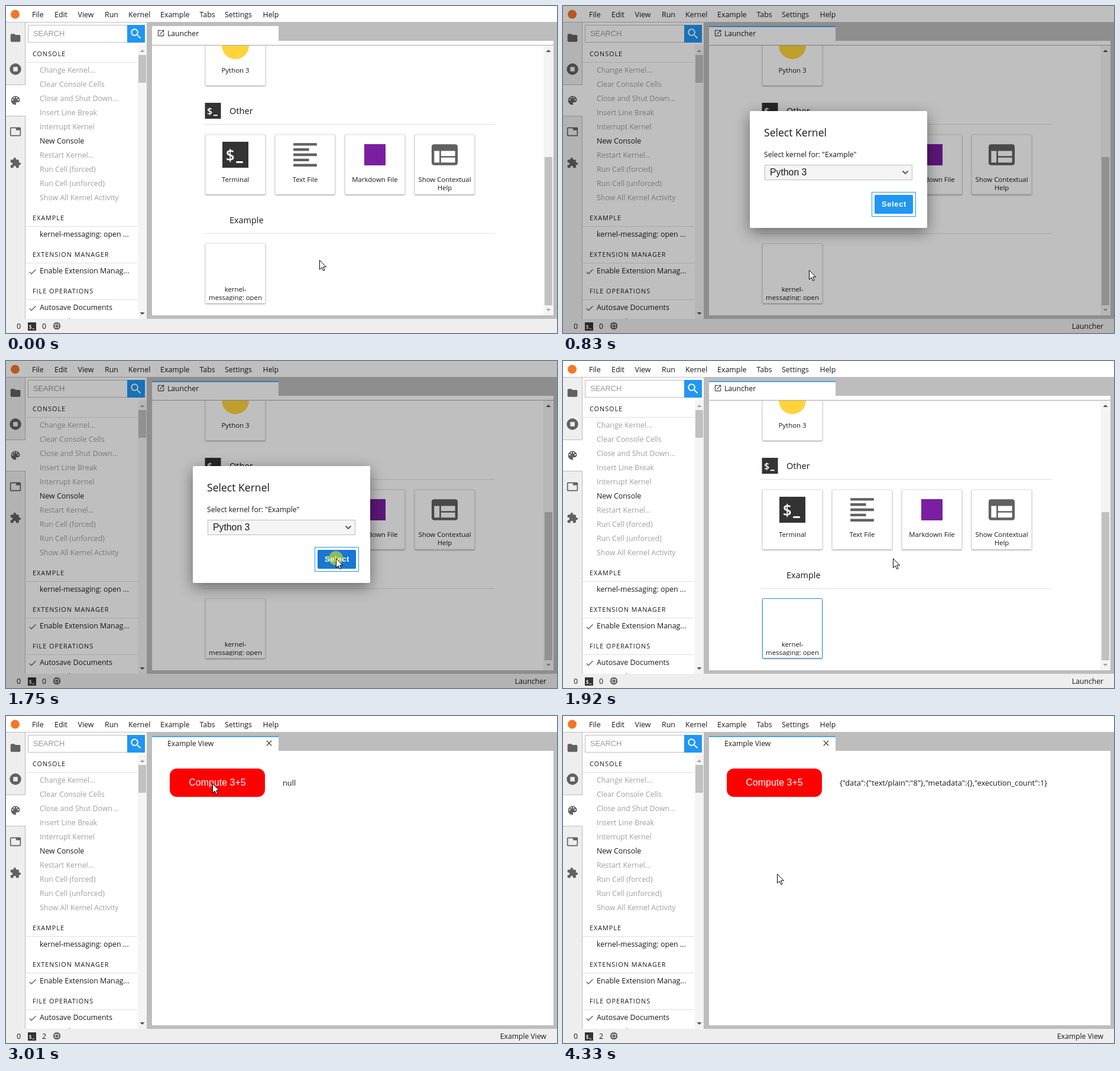
Recreate the animation shown at these times as an HTML page. Size 932x554 px, loop 5.12 s.

```html
<!DOCTYPE html>
<html lang="en">
<head>
<meta charset="utf-8">
<title>Kernel messaging demo</title>
<style>
  html, body { margin: 0; width: 100%; height: 100%; overflow: hidden; background: #fff; }
  svg { display: block; }
  text { font-family: "Open Sans", "Noto Sans", sans-serif; white-space: pre; }
  .arial { font-family: "Liberation Sans", Arial, sans-serif; }
  .card { fill: #fff; stroke: #e2e2e2; filter: drop-shadow(0 1px 1.2px rgba(0,0,0,.38)); }
  .card.hover { filter: drop-shadow(0 2px 4px rgba(0,0,0,.45)); }
  .card.focus { stroke: #2196f3; }
  #dialogBox { filter: drop-shadow(0 7px 12px rgba(0,0,0,.45)); }
</style>
</head>
<body>
<svg id="stage" width="932" height="554" viewBox="0 0 932 554"></svg>
<script>
const GREY = '#616161', BLUE = '#2196f3', LINE = '#bdbdbd';

const icons = {
  folder: 'M10 4H4Q2 4 2 6V18Q2 20 4 20H20Q22 20 22 18V8Q22 6 20 6H12z',
  running: 'M12 .4a11.6 11.6 0 1 0 .01 0zM7.500 7.500h9v9h-9z',
  palette: 'M12 3a9 9 0 0 0 0 18c.8 0 1.500-.7 1.500-1.500 0-.9-.8-1.200-.8-2 0-.8.7-1.500 1.500-1.500H16a5 5 0 0 0 5-5C21 6.600 17 3 12 3z'
    + [[6.5, 9], [9.5, 5], [14.5, 5], [17.5, 9]].map(([x, y]) => `M${x} ${y}a1.5 1.5 0 1 0 .01 0z`).join(''),
  tab: 'M3 3H21Q23 3 23 5V19Q23 21 21 21H3Q1 21 1 19V5Q1 3 3 3zM3 5V19H21V9H13V5z',
  puzzle: 'M20.5 11H19V7a2 2 0 0 0-2-2h-4V3.500a2.500 2.500 0 0 0-5 0V5H4a2 2 0 0 0-2 2v3.800h1.500a2.700 2.700 0 0 1 0 5.400H2V20a2 2 0 0 0 2 2h3.800v-1.500a2.700 2.700 0 0 1 5.400 0V22H17a2 2 0 0 0 2-2v-4h1.500a2.500 2.500 0 0 0 0-5z',
  search: 'M9.500 3a6.500 6.500 0 1 0 4.200 11.400l.3.300v.8l5 5 1.500-1.500-5-5h-.8l-.3-.3A6.500 6.500 0 0 0 9.500 3zM9.500 5a4.500 4.500 0 1 1-.01 0z',
  launch: 'M19 19H5V5h7V3H5Q3 3 3 5V19Q3 21 5 21H19Q21 21 21 19V12H19zM14 3v2h3.600L7.800 14.800l1.400 1.400L19 6.400V10h2V3z',
  check: 'M9 16.2L4.800 12l-1.400 1.400L9 19 21 7l-1.400-1.400z',
  close: 'M19 6.400L17.600 5 12 10.600 6.400 5 5 6.400 10.600 12 5 17.600 6.400 19 12 13.400 17.600 19 19 17.600 13.400 12z',
  chip: 'M15 9H9v6h6zM13 13h-2v-2h2zM21 11V9h-2V7q0-2-2-2h-2V3h-2v2h-2V3H9v2H7q-2 0-2 2v2H3v2h2v2H3v2h2v2q0 2 2 2h2v2h2v-2h2v2h2v-2h2q2 0 2-2v-2h2v-2h-2v-2zM17 17H7V7h10z',
  lines: 'M3 3h18v2H3zM3 7h12v2H3zM3 11h18v2H3zM3 15h12v2H3zM3 19h18v2H3z',
  help: 'M4 4H20Q22 4 22 6V18Q22 20 20 20H4Q2 20 2 18V6Q2 4 4 4zM4 9V18H8V9zM9.200 9V13H20V9zM9.200 14.200V18H20V14.200z'
};

const rect = (x, y, w, h, fill, more = '') =>
  `<rect x="${x}" y="${y}" width="${w}" height="${h}" fill="${fill}" ${more}/>`;
const text = (x, y, s, size = 12.4, more = '') =>
  `<text x="${x}" y="${y}" font-size="${size}" ${more}>${s}</text>`;
const mid = (x, y, s, size = 11.4, more = '') => text(x, y, s, size, `text-anchor="middle" ${more}`);
const icon = (name, cx, cy, size = 20, fill = GREY) =>
  `<path transform="translate(${cx - size / 2} ${cy - size / 2}) scale(${size / 24})" d="${icons[name]}" fill="${fill}" fill-rule="evenodd"/>`;
const triangle = (x, y, dir, fill) =>
  `<path d="M${x - 4} ${y + 2 * dir}h8l-4 ${-4 * dir}z" fill="${fill}"/>`;
const terminal = (x, y, s) => rect(x, y, s, s, '#333')
  + text(x + .13 * s, y + .75 * s, '$', .6 * s, 'fill="#fff" font-weight="600"')
  + rect(x + .53 * s, y + .75 * s, .26 * s, .07 * s, '#fff');
const card = (x, y, more = '') =>
  `<rect class="card" x="${x + .5}" y="${y + .5}" width="101" height="101" rx="1" ${more}/>`;
const group = (id, ...parts) => `<g id="${id}">${parts.join('')}</g>`;

function menuBar() {
  const items = { File: 44, Edit: 82, View: 121.5, Run: 167, Kernel: 207, Example: 261, Tabs: 327.5, Settings: 370, Help: 434.5 };
  return rect(0, 0, 932, 27, '#fff') + rect(0, 27, 932, 1, LINE)
    + '<circle cx="15.5" cy="14" r="7.500" fill="#f37726"/>'
    + Object.entries(items).map(([s, x]) => text(x, 19, s)).join('');
}

function sideBar() {
  const names = ['folder', 'running', 'palette', 'tab', 'puzzle'];
  return rect(0, 28, 33, 502, '#eee') + rect(32, 28, 1, 502, LINE)
    + rect(0, 133, 33, 54, LINE) + rect(0, 134, 33, 52, '#fff')
    + names.map((n, i) => icon(n, 16, 54 + 53 * i)).join('');
}

function palettePanel() {
  const header = (y, s) => text(45, y + 4, s, 10.8, 'letter-spacing="1"') + rect(33, y + 14, 189, 1, '#e0e0e0');
  const item = (y, s, on) => text(57, y + 4.5, s, 12.4, on ? '' : 'fill="#a0a0a0"');
  const checked = (y, s) => icon('check', 45, y + 2, 16) + item(y, s, true);
  const consoleItems = ['Change Kernel...', 'Clear Console Cells', 'Close and Shut Down...', 'Insert Line Break',
    'Interrupt Kernel', 'New Console', 'Restart Kernel...', 'Run Cell (forced)', 'Run Cell (unforced)', 'Show All Kernel Activity'];
  return rect(33, 28, 206, 502, '#fff') + rect(238, 28, 1, 502, LINE)
    + rect(37.5, 32.5, 168, 29, '#fff', `stroke="${LINE}"`)
    + text(46, 51, 'SEARCH', 12.8, 'class="arial" fill="#9a9a9a"')
    + rect(205, 32, 30, 30, BLUE) + icon('search', 220, 47, 23, '#fff')
    + header(81, 'CONSOLE')
    + consoleItems.map((s, i) => item(108 + 24 * i, s, s === 'New Console')).join('')
    + header(359, 'EXAMPLE') + item(386, 'kernel-messaging: open ...', true)
    + header(421, 'EXTENSION MANAGER') + checked(448, 'Enable Extension Manag...')
    + header(483, 'FILE OPERATIONS') + checked(510, 'Autosave Documents')
    + item(534, 'Save and Format Text', true)
    + rect(223, 66, 15, 464, '#f4f4f4') + rect(224, 83, 13, 47, '#c1c1c1')
    + triangle(230.5, 76, 1, '#a3a3a3') + triangle(230.5, 521, -1, '#505050');
}

function launcher() {
  return group('launcher',
    card(337, 33), '<circle cx="388" cy="67" r="23" fill="#ffd43b"/>', mid(388, 113, 'Python 3'),
    rect(247, 28, 679, 39, '#fff'), rect(247, 66, 679, 1, '#a6a6a6'),
    terminal(336.5, 164, 27), text(378, 183, 'Other', 14.6), rect(334, 200, 493, 1, '#e0e0e0'),
    [337, 455, 573, 691].map(x => card(x, 217.5)).join(''),
    terminal(366, 230, 44), icon('lines', 506, 252, 53),
    rect(606, 234, 36, 36, '#7b1fa2'), icon('help', 742, 252, 53),
    mid(388, 298, 'Terminal'), mid(506, 298, 'Text File'), mid(624, 298, 'Markdown File'),
    mid(742, 298, 'Show Contextual'), mid(742, 312, 'Help'),
    text(378, 368, 'Example', 14.4), rect(334, 385, 493, 1, '#e0e0e0'),
    card(337, 402, 'id="exampleCard"'),
    mid(388, 483.5, 'kernel-'), mid(388, 497.5, 'messaging: open'), rect(342, 499, 92, 4, '#fff'),
    rect(909, 67, 17, 457, '#f4f4f4'), rect(911, 256, 13, 251, '#c1c1c1'),
    triangle(917.5, 76, 1, '#505050'), triangle(917.5, 515, -1, '#a3a3a3'));
}

function dock() {
  return rect(247, 59, 679, 465, '#fff') + launcher()
    + group('example',
      rect(277, 89, 161, 48, '#f00', 'rx="12"'),
      mid(357.5, 118, 'Compute 3+5', 16, 'class="arial" fill="#fff"'),
      text(468, 118, '', 12.8, 'id="output"'))
    + rect(239, 28, 693, 31, LINE) + rect(239, 59, 8, 471, LINE)
    + rect(926, 59, 6, 471, LINE) + rect(239, 524, 693, 6, LINE)
    + rect(247, 34, 214, 25, '#fff') + group('tabMark', rect(247, 34, 214, 1.6, BLUE))
    + group('launchIcon', icon('launch', 262, 46, 14, '#424242'))
    + group('closeIcon', icon('close', 445, 46, 16, '#424242'))
    + text(273, 51, '', 12.2, 'id="tabTitle"');
}

function statusBar() {
  return rect(0, 530, 932, 24, '#eee')
    + text(18, 547, '0') + terminal(37, 536, 14) + text(61, 547, '', 12.4, 'id="kernels"')
    + icon('chip', 86, 542, 17, '#424242')
    + text(914, 547, '', 12.2, 'id="status" text-anchor="end"');
}

function dialog() {
  return group('dialog',
    rect(0, 0, 932, 554, '#000', 'opacity=".25"'),
    rect(316, 178, 300, 198, '#fff', 'rx="2" id="dialogBox"'),
    text(340, 221, 'Select Kernel', 17.6),
    text(340, 256, 'Select kernel for: "Example"', 12.2),
    rect(341.5, 269.5, 249, 25, '#f5f5f5', `stroke="${LINE}"`),
    text(350, 287, 'Python 3', 15.8, 'class="arial"'),
    '<path d="M574.500 279.500l4.500 4.500 4.500-4.500" fill="none" stroke="#505050" stroke-width="1.800"/>',
    rect(522.5, 315.5, 74, 41, '#fff', `stroke="${BLUE}"`),
    rect(527, 320, 65, 32, BLUE, 'rx="2" id="selectButton"'),
    text(539, 340, 'Select', 13, 'class="arial" fill="#fff" font-weight="bold" letter-spacing=".6"'));
}

function pointer() {
  const style = 'fill="#fff" stroke="#000" stroke-linejoin="round"';
  return group('pointer',
    '<circle id="click" r="12" fill="#ff0" opacity=".5"/>',
    `<path id="arrow" ${style} d="M.5.700V16.300L4.200 13l2.500 5.500 2.300-1L6.600 12h4.900z"/>`,
    `<path id="hand" ${style} transform="translate(-5 0)" d="M5.500 13V2a1.500 1.500 0 0 1 3 0V8.500a1.500 1.500 0 0 1 3 .3a1.500 1.500 0 0 1 2.800.7a1.400 1.400 0 0 1 2.700.8V15c0 3-1.500 4-1.500 7.500H6.500C6 19 3 16 1 12.800a1.500 1.500 0 0 1 2.500-1.500z"/>`);
}

document.getElementById('stage').innerHTML =
  `<g fill="#181818">${menuBar()}${sideBar()}${palettePanel()}${dock()}${statusBar()}${dialog()}${pointer()}</g>`;

const el = Object.fromEntries([...document.querySelectorAll('[id]')].map(e => [e.id, e]));
const show = (id, on) => { el[id].style.display = on ? '' : 'none'; };
const within = (t, a, b) => t >= a && t < b;

// Pointer moves: first step, last step, step count, end x, end y
const moves = [
  [70, 520, 7, 416, 447],
  [1210, 1610, 6, 568, 323],
  [1680, 1680, 1, 558, 334],
  [2150, 2610, 7, 347, 125],
  [2680, 2770, 2, 349, 114],
  [3170, 3400, 4, 361, 267],
  [3550, 3550, 1, 362, 267]
];

function pointerAt(t) {
  let x = 530, y = 430;
  for (const [start, end, steps, toX, toY] of moves) {
    if (t < start) break;
    const gap = (end - start) / (steps - 1) || 1;
    const k = Math.min(1, (Math.floor((t - start) / gap + .01) + 1) / steps);
    const e = k * k * (3 - 2 * k);
    x += (toX - x) * e;
    y += (toY - y) * e;
  }
  return [Math.round(x), Math.round(y)];
}

function draw(t) {
  const [x, y] = pointerAt(t);
  const opened = t >= 1990;
  const modal = within(t, 830, 1920);
  const hover = t < 830 && x < 438;
  const active = within(t, 830, 1990) || t >= 2920;
  const title = opened ? 'Example View' : 'Launcher';

  show('launcher', !opened);
  show('launchIcon', !opened);
  show('example', opened);
  show('closeIcon', opened);
  show('tabMark', active);
  show('dialog', modal);
  show('hand', hover);
  show('arrow', !hover);
  show('click', within(t, 600, 750) || within(t, 1750, 1920) || within(t, 2920, 3010));

  el.exampleCard.classList.toggle('hover', hover);
  el.exampleCard.classList.toggle('focus', within(t, 1920, 1990));
  el.selectButton.setAttribute('fill', t >= 1750 ? '#1976d2' : BLUE);
  el.tabTitle.textContent = title;
  el.status.textContent = active ? title : '';
  el.kernels.textContent = opened ? '2' : '0';
  el.output.textContent = t < 4330 ? 'null' : '{"data":{"text/plain":"8"},"metadata":{},"execution_count":1}';
  el.pointer.setAttribute('transform', `translate(${x} ${y})`);
}

const begin = performance.now();
function tick() {
  draw((performance.now() - begin) % 5120);
  requestAnimationFrame(tick);
}
tick();
</script>
</body>
</html>
```
